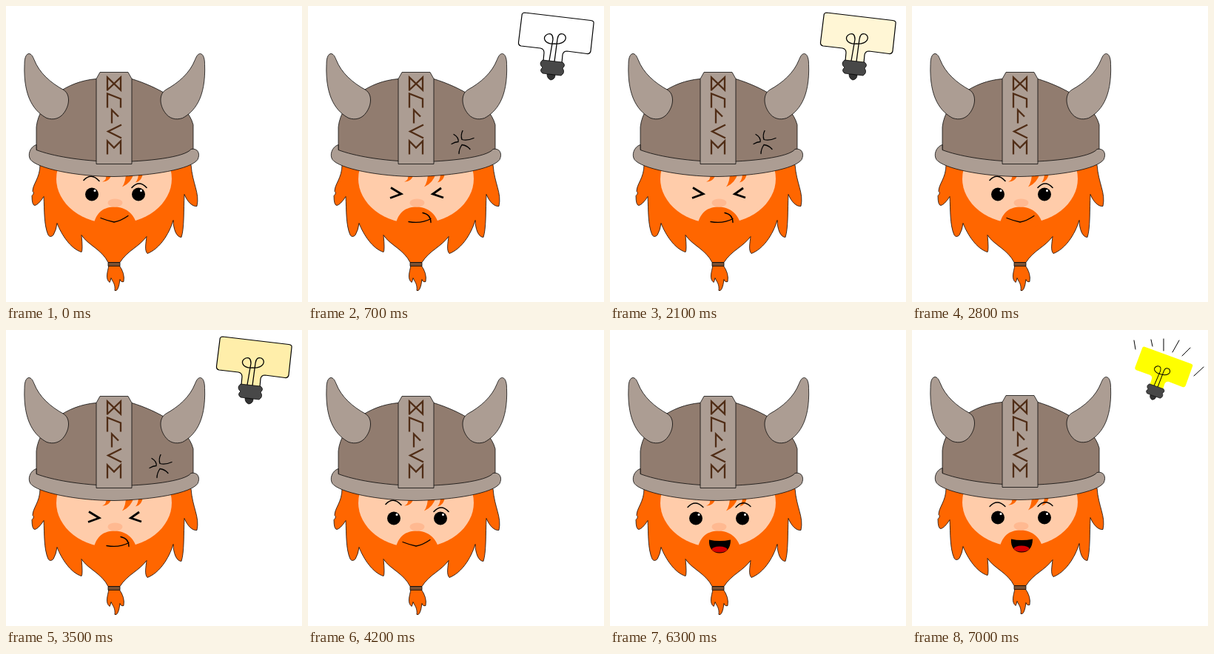
These frames come from a looping animation (400 by 400 pixels, 7700 ms). An HTML page:

```html
<!DOCTYPE html>
<html lang="en">
<head>
<meta charset="utf-8">
<title>Viking has an idea</title>
<style>
html, body { margin: 0; width: 100%; height: 100%; overflow: hidden; background: #fff }
svg { display: block; width: 100vw; height: 100vh }
.edge { stroke: #000; stroke-width: .75 }
.line { fill: none; stroke: #000; stroke-width: 1.3; stroke-linecap: round }
</style>
</head>
<body>
<svg viewBox="0 0 400 400">
  <defs>
    <path id="horn" class="edge" fill="#ac9d93" d="M25 78C25 68 28 64 31 64C34 64 36 67 38 72C45 90 60 103 78 113C87 119 86 133 79 143C73 152 64 154 55 151C40 143 23 125 25 78Z"/>
  </defs>
  <g id="head">
    <g class="edge" fill="#f60">
      <path d="M46 214C46 232 36 240 36 250Q39 252 35 256Q35 269 39 269Q44 268 51 257C52 275 51 295 57 309Q60 313 64 309Q68 302 69 293C75 309 88 328 102 332Q104 330 102 309C110 322 130 329 138 346H154C164 330 180 325 190 311C189 320 187 330 191 334C207 328 220 309 226 289C226 300 230 312 237 312C241 300 240 275 241 254C245 264 252 271 258 270C262 252 252 240 250 214Z"/>
      <path d="M139 350C137 360 134 368 140 373Q141 372 142 367C144 372 148 375 147 384Q152 386 154 369Q155 373 159 372Q161 361 153 350Z"/>
      <path fill="#785033" d="M138 346H154V351H138Z"/>
    </g>
    <ellipse cx="146" cy="233" rx="78" ry="61" fill="#fca"/>
    <path fill="#f60" d="M119 292C124 276 134 271 147 271C162 271 173 281 176 293L160 302H132ZM130 237Q137 235 135 225H143Q141 237 130 237ZM157 244Q162 237 162 225H173Q169 239 157 244ZM175 238Q179 234 179 225H185Q184 236 175 238Z"/>
    <ellipse cx="147.500" cy="265.500" rx="10" ry="5.500" fill="#ffb991"/>
    <g class="edge" fill="#ac9d93">
      <path fill="#917c6f" d="M41 205V163C45 127 83 101 122 98H170C205 109 245 130 253 160V205Q146 225 41 205Z"/>
      <path d="M41 187C32 190 29 201 33 207C42 219 95 230 146 230C198 229 250 220 259 207C263 199 259 191 250 193C242 204 190 210 146 210C100 209 62 202 41 194Z"/>
      <path d="M127 89H165L170 98V213H122V98Z"/>
    </g>
    <use href="#horn"/>
    <use href="#horn" transform="matrix(-1 0 0 1 293.500 0)"/>
    <path fill="none" stroke="#502d16" stroke-width="2.300" d="M137 114V96L155 113V96L137 113M137 137V118L155 125V137M143 158V140L152 149M156 160L138 169L156 178M137 200V182L146 191L155 182V200"/>
    <g id="eyes">
      <circle cx="116" cy="254" r="9"/><circle cx="179" cy="254" r="9"/>
      <g fill="#fff"><circle cx="120" cy="249" r="1.500"/><circle cx="182.500" cy="249" r="1.500"/></g>
    </g>
    <g id="calm" class="line">
      <path stroke-width="1.600" d="M105 235Q115 224 126 236M170 245Q180 234 190 245"/>
      <path d="M128 286Q138 290 146 291.500Q155 290 165 283"/>
    </g>
    <g id="strain" class="line">
      <path style="stroke-width:2.800;stroke-linecap:butt" d="M112 245L126 253.500L111 259M180 245.500L168.500 253.500L183 258.500"/>
      <path d="M136 291Q153 294 166 287M155 279Q166 281 166 292"/>
      <path d="M197 173Q204 177 203 183Q199 183 194 186M209 168Q206 174 208 180Q215 182 224 178M204 199Q204 193 208 187Q215 188 219 193"/>
    </g>
    <g id="happy">
      <path class="line" stroke-width="1.600" d="M105 239Q115 228 126 239M170 239Q180 228 190 238"/>
      <path d="M134 283Q148 286 163 283C163 295 157 301 148 301C139 301 133 294 134 283Z"/>
      <ellipse cx="148" cy="296" rx="10.500" ry="4" fill="#d40000"/>
    </g>
  </g>
  <g id="bulb">
    <path id="glass" stroke="#000" stroke-width="1.200" d="M293 9L382 19.500Q387 20 386 24L382 61Q381 65 377 64.500L350 61Q345 61 344 66L343 77L318 74L319 63Q319 58 314 57L288 54Q284 53 284.500 49L289 13Q289 9 293 9Z"/>
    <path class="line" d="M326 74L331 45Q331 36 324 38C315 42 320 52 333 51C348 52 352 42 345 38Q338 36 337 45L333 75"/>
    <path class="edge" fill="#333" d="M323 92L334 93Q334 99 328 100Q323 98 323 92Z"/>
    <path class="edge" fill="#484848" d="M317 73L344 76Q349 80 344 84Q348 90 342 94L317 91Q312 87 317 83Q311 78 317 73Z"/>
  </g>
  <path id="rays" class="line" style="stroke-width:1" d="M300 14L302 26M323 13L325 22M340 12V28M361 14L352 30M376 24L365 35M394 50L381 62"/>
</svg>
<script>
const STEP = 700, STEPS = 11;
const glow = ['#fff', '#fff6d5', '#ffeeaa', '#ffe680'];
const el = id => document.getElementById(id);
const show = (id, on) => el(id).style.display = on ? '' : 'none';

function draw(time) {
  const step = Math.floor(time / STEP) % STEPS;
  const happy = step > 8, idea = step === 10, strain = !happy && step % 2 === 1;
  show('calm', !happy && !strain);
  show('strain', strain);
  show('happy', happy);
  show('eyes', !strain);
  show('bulb', strain || idea);
  show('rays', idea);
  el('glass').setAttribute('fill', idea ? '#ff0' : glow[step >> 1] || '#fff');
  el('glass').setAttribute('stroke', idea ? 'none' : '#000');
  el('bulb').setAttribute('transform', idea ? 'translate(340 50) rotate(13.4) scale(.74) translate(-335 -37)' : '');
  el('head').setAttribute('transform', `translate(0 ${idea ? -.5 : .5})`);
}

const start = performance.now();
function tick() {
  draw(performance.now() - start);
  requestAnimationFrame(tick);
}
tick();
</script>
</body>
</html>
```
